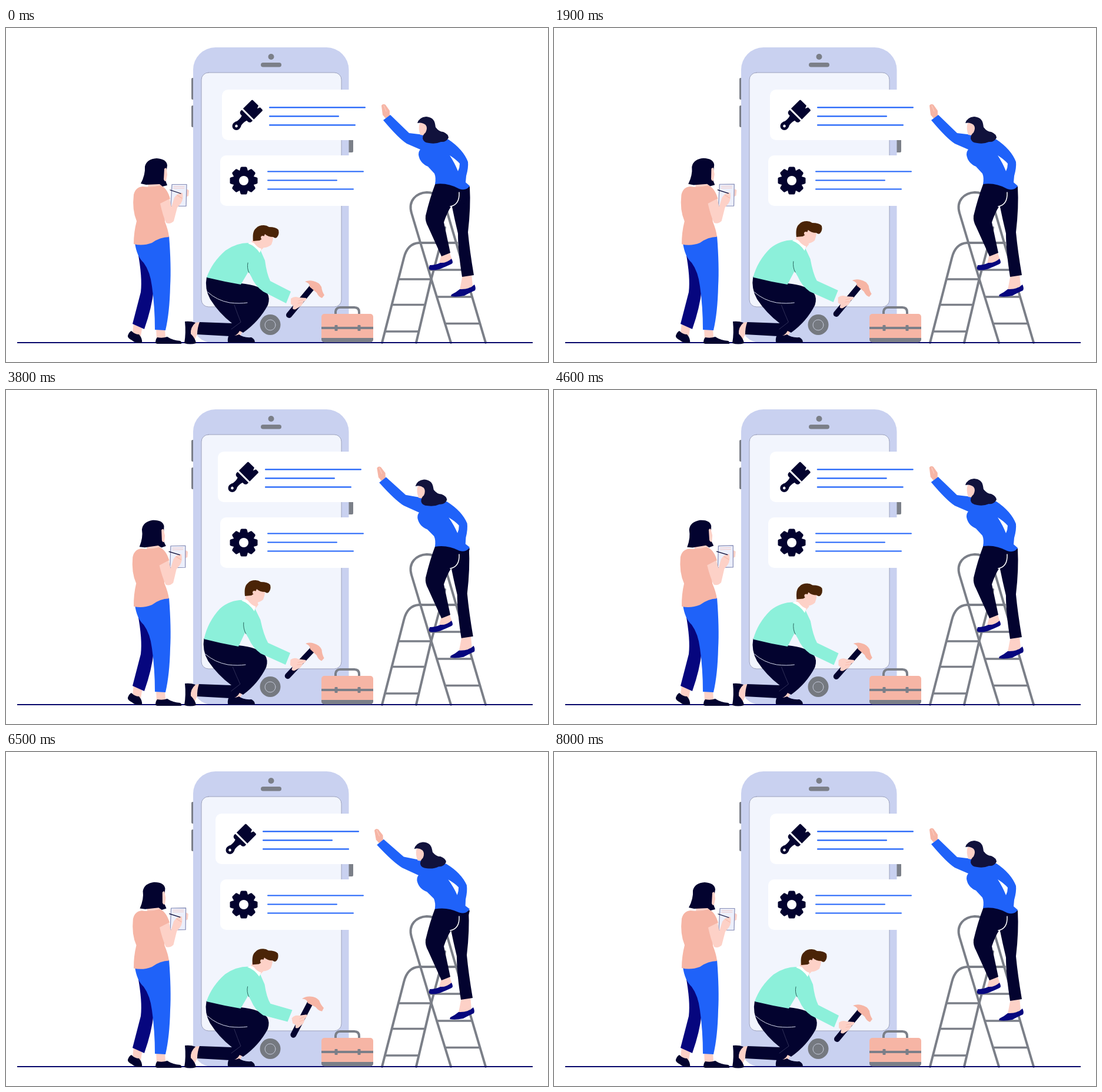
Animation, 921 px wide and 569 px high, one loop 8.1 s. Source, as an HTML page with a canvas:

```html
<!DOCTYPE html>
<html lang="en">
<head>
<meta charset="utf-8">
<title>Building an app</title>
<style>
html, body { margin: 0; width: 100%; height: 100%; overflow: hidden; background: #fff; }
canvas { display: block; width: 921px; height: 569px; }
</style>
</head>
<body>
<canvas id="stage" width="921" height="569"></canvas>
<script>
const ctx = document.getElementById('stage').getContext('2d');
const LOOP = 8100, STEP = 100;
const NAVY = '#03032f', HAIR = '#11123c', BLUE = '#1f62f9', INDIGO = '#06067e', PINK = '#f6b5a5',
  SKIN = '#fdd1c7', MINT = '#8cf0da', BROWN = '#4a2407', GRAY = '#7b7f88',
  BODY = '#c9d1f0', SCREEN = '#f2f5fd', WHITE = '#fff';

// Key poses as [time, value], eased between neighbours
const SLIDE = [[0, 0], [1900, 0], [2800, 1], [3100, 1], [3800, .64], [4700, 0], [5600, 0], [6500, 1], [6700, 1], [7800, 0]];
const SWAY = [[0, 0], [800, 0], [1900, .25], [3800, .75], [5000, 1], [5500, 1], [6500, .5], [8000, 0]];
const LEAN = [[0, 0], [800, -.06], [1900, .58], [3200, 1], [3800, 1], [5500, 0], [6500, .07], [8000, 0]];
const HAND_X = [[0, 0], [800, -1.5], [3800, -1], [5500, 0], [5900, 0], [6500, 2.5], [7100, 0]];
const HAND_Y = [[0, 0], [800, -2.5], [1900, -2], [3800, -1], [5500, 0], [5900, 0], [6500, -9.5], [7100, 0]];
const SWING = [[0, 0], [1900, 0], [3800, .06], [5500, 0], [5900, 0], [6500, -.21], [7100, 0]];

const clamp = v => Math.max(0, Math.min(1, v));

function pose(keys, t) {
  const i = keys.findIndex(k => k[0] > t);
  if (i < 0) return keys[keys.length - 1][1];
  const [t0, a] = keys[i - 1], [t1, b] = keys[i];
  const p = (t - t0) / (t1 - t0);
  return a + (b - a) * p * p * (3 - 2 * p);
}

function fill(d, color) {
  ctx.fillStyle = color;
  ctx.fill(new Path2D(d));
}

function stroke(d, color, width) {
  ctx.strokeStyle = color;
  ctx.lineWidth = width;
  ctx.stroke(new Path2D(d));
}

function disc(x, y, r, color) {
  ctx.fillStyle = color;
  ctx.beginPath();
  ctx.arc(x, y, r, 0, 7);
  ctx.fill();
}

function box(x, y, w, h, r, color) {
  ctx.fillStyle = color;
  ctx.beginPath();
  ctx.roundRect(x, y, w, h, r);
  ctx.fill();
}

function moved(x, y, draw) {
  ctx.save();
  ctx.translate(x, y);
  draw();
  ctx.restore();
}

function turned(x, y, angle, draw) {
  moved(x, y, () => {
    ctx.rotate(angle);
    ctx.translate(-x, -y);
    draw();
  });
}

function phone() {
  box(315, 85, 6, 37, 2, GRAY);
  box(315, 132, 6, 37, 2, GRAY);
  box(580, 186, 10, 26, 2, GRAY);
  box(318, 33, 264.5, 503, [38, 38, 32, 32], BODY);
  box(332, 76, 238, 399, 12, SCREEN);
  ctx.strokeStyle = '#9da2bd';
  ctx.lineWidth = 1;
  ctx.stroke();
  disc(450.5, 49, 5, GRAY);
  box(433, 59, 35, 7.5, 4, GRAY);
  disc(449, 505.5, 17.5, '#757980');
  stroke('M458 506A9 9 0 1 1 440 506A9 9 0 1 1 458 506', '#c3c8d8', 1);
}

function card(x, y, firstLine) {
  box(x, y, 268, 86, 10, WHITE);
  [163, 118, 146].forEach((w, i) => box(x + 80, firstLine + 15 * i, w + 1, 2.2, 1, BLUE));
}

function brush(x, y) {
  moved(x, y, () => {
    ctx.rotate(-Math.PI / 4);
    fill('M0 -13L20 -13Q22 -13 22 -11L22 2L17 4L22 6L22 11Q22 13 20 13L0 13Z', NAVY);
    fill('M-3 -13L-3 13L-6 13Q-10 12 -10 8L-10 6Q-15 4 -22 5Q-25 7 -29 7A7 7 0 0 1 -29 -7Q-25 -7 -22 -5Q-15 -4 -10 -6L-10 -8Q-10 -12 -6 -13Z', NAVY);
    disc(-29, 0, 2.3, WHITE);
  });
}

function gear(x, y) {
  disc(x, y, 18, NAVY);
  for (let i = 0; i < 8; i++) {
    turned(x, y, i * Math.PI / 4, () =>
      fill(`M${x - 7.5} ${y - 15}L${x - 5.5} ${y - 22}Q${x - 5} ${y - 23.5} ${x - 3.5} ${y - 23.5}L${x + 3.5} ${y - 23.5}Q${x + 5} ${y - 23.5} ${x + 5.5} ${y - 22}L${x + 7.5} ${y - 15}Z`, NAVY));
  }
  disc(x, y, 8, WHITE);
}

function toolbox() {
  stroke('M560 488L560 483Q561 476 568 476L592 476Q600 476 600 484L600 488', GRAY, 4);
  box(536, 487, 88, 48, 5, PINK);
  box(536, 509, 88, 4, 0, GRAY);
  box(536, 528, 88, 7.5, [0, 0, 5, 5], GRAY);
  box(558.5, 506, 5, 10, 1, GRAY);
  box(597.5, 506, 5, 10, 1, GRAY);
}

function ladder() {
  stroke('M639 536L676 392Q682 367 702 366L766 366', GRAY, 4);
  stroke('M697 536L722 430L746 340', GRAY, 4);
  stroke('M668 428L722 428M656 471.5L712 471.5M645 517L701 517', GRAY, 3.5);
  stroke('M756 536L724 432L689 315C683 294 697 281 715 280C733 280 744 293 748 308L765 366L815 536', GRAY, 4);
  stroke('M719 412L776 412M733 458L791 458M746 503.5L805 503.5', GRAY, 3.5);
}

function climber(k) {
  // Legs
  fill('M740 386L754 383L758 395L745 403L736 400Z', SKIN);
  fill('M720 404Q730 404 738 400Q748 401 757 393Q761 400 757 402Q744 408 736 411Q724 414 719 411Q718 408 720 404Z', INDIGO);
  moved(-2 * k, -2 * k, () => {
    fill('M776 420L791 418L793 440L776 447L771 446Z', SKIN);
    fill('M757 454Q764 451 771 445Q787 446 796 437Q799 443 797 447Q786 452 779 456Q765 459 756 457Z', INDIGO);
    fill('M752 266L788 271Q790 305 785 348Q788 380 795 421L775 424Q768 380 768 350Q762 325 757 300Z', NAVY);
  });
  fill('M730 264Q720 290 713 320Q712 329 717 338L740 389L755 383L744 331Q750 313 757 303L781 298L788 270Q760 258 730 264Z', NAVY);
  stroke('M770 280Q771 301 755 304', WHITE, 1.5);

  turned(760, 270, -.05 * k, () => {
    const at = (x, y, f = 1) => `${x - 5 * k * f} ${y - 5 * k * f}`;
    fill(`M${at(638, 132)}Q${at(641, 128)} ${at(645, 131)}L${at(652, 141)}L${at(652, 150)}L${at(645, 154)}L${at(640, 148)}Z`, PINK);
    stroke(`M${at(642, 132)}L${at(646, 142)}`, SKIN, 1);
    fill(`M${at(641, 157)}L${at(653, 148)}L${at(685, 179, .9)}L710 182L752 190Q777 207 785 228Q786 238 782 252L781 263L788 269Q782 278 770 274Q750 263 729 266Q731 255 728 248L717 236Q703 230 701 216Q701 210 704 207L${at(681, 197, .8)}Q${at(667, 188, .9)} ${at(641, 157)}Z`, BLUE);
    fill('M754 217Q765 224 771 231Q771 238 768 244Q763 231 754 217Z', WHITE);
    fill('M703 162L716 160L719 186L711 190L710 183L704 182Q700 171 703 162Z', SKIN);
    fill('M699 162Q702 152 714 151Q727 152 729 163L730 169Q736 177 743 177Q752 181 752 187Q748 195 739 194Q730 198 719 196Q709 195 708 188Q708 182 713 178Q717 170 713 165Q707 160 699 162Z', HAIR);
  });
}

function writer(sway) {
  fill('M217 502L232 507L229 525L215 520Z', SKIN);
  fill('M255 511L270 512L271 528L256 530Z', SKIN);
  fill('M207 524Q209 518 213 516Q219 522 226 522Q232 529 231 536Q221 538 214 532Q206 528 207 524Z', NAVY);
  fill('M254 537Q254 530 257 527Q266 529 274 526Q283 532 296 533Q299 535 298 538L257 538Z', NAVY);
  fill('M224 382Q232 425 229 450L215 504L235 513Q248 476 251 445L244 385Z', INDIGO);
  fill('M219 366L277 354Q281 405 279 440Q278 485 271 515L253 514Q253 475 248 440Q245 415 234 400Q222 389 219 366Z', BLUE);

  turned(247, 365, -.0286 * sway, () => {
    fill('M242 260L263 260L264 273L241 273Z', SKIN);
    fill('M232 270Q248 272 263 268Q274 273 279 291L268 300L270 330Q276 345 277 356Q262 356 248 366Q232 372 217 368Q217 348 222 329Q214 310 217 284Q220 271 232 270Z', PINK);
    turned(252, 268, -.1 * sway, () => {
      fill('M229 265Q237 250 236 236Q239 223 256 222Q273 223 274 234L271 255Q271 262 274 268L266 270L261 266L238 267Z', NAVY);
      fill('M269 240Q273 236 273 243L274 250L272 260Q270 263 268 258Z', SKIN);
    });
    fill('M303 276Q308 273 311 277L310 286L304 289Z', SKIN);
    fill('M282 266.5L307 266.5L306 303.5L280 303.5Z', '#eceffb');
    stroke('M282 266.5L307 266.5L306 303.5L280 303.5Z', '#858bb5', 1.2);
    stroke('M285 270L303 270M285 273L303 273', '#f3c9c6', 1);
    fill('M262 299L278 291L281 305L286 289Q292 280 300 281Q302 292 297 299L291 306L285 329Q279 335 272 332Q266 318 262 299Z', SKIN);
    stroke('M279 276L297 282', NAVY, 1.3);
    stroke('M291 285L299 290', PINK, 1);
  });
}

function builder(lean, hx, hy, swing) {
  // Bends the back away from the hips; the forearm follows the hand
  const warp = arm => (_, x, y) => {
    const up = clamp((430 - y) / 93);
    const base = clamp((470 - x) / 24) * clamp((520 - y) / 70);
    const reach = arm * clamp((x - 435) / 40) * clamp((y - 410) / 30);
    return `${+x - lean * (4 * base + 10 * up) + hx * reach} ${+y - lean * 12 * up + hy * reach}`;
  };
  const bend = (d, arm = 0) => d.replace(/([\d.]+) ([\d.]+)/g, warp(arm));

  // Feet and trousers
  fill('M312 503L329 501L325 521L319 535L312 525Z', SKIN);
  fill('M304 500Q314 499 322 502Q313 510 314 521Q322 529 323 537Q313 540 303 537Q306 520 304 500Z', NAVY);
  fill('M384 510L402 516L396 528L381 524Z', SKIN);
  fill('M377 535Q376 526 380 522Q387 526 396 522Q403 528 417 527Q423 530 423 536L378 536Z', NAVY);
  fill(bend('M341 424L399 435Q432 438 444 452Q449 460 445 472Q430 500 403 519L397 516Q392 526 380 525L325 522Q325 511 329 501L384 503Q362 486 347 462Q337 444 341 424Z'), NAVY);
  stroke(bend('M343 450Q358 464 380 468Q397 470 410 468'), '#d8dcec', 1);
  stroke(bend('M388 472Q394 489 399 501L383 513'), '#3b3c62', .8);

  // Neck and head
  fill(bend('M420 358L436 362L439 373L431 381L416 368Z'), SKIN);
  moved(-14 * lean, -12 * lean, () => {
    fill('M421 358L433 348L455 352L453 363L451 369Q444 375 437 374L433 378L422 372Z', SKIN);
    fill('M420 363Q418 346 425 341Q429 336 438 336Q443 336 447 339Q459 339 463 344Q465 352 460 357Q457 359 454 356Q445 356 440 351Q437 359 431 362Z', BROWN);
    disc(436, 357, 3, SKIN);
  });

  // Jumper
  fill(bend('M341 425Q350 399 373 379Q391 366 413 366Q425 368 433 380L440 396Q443 419 449 431L484 449L476 469L437 449Q423 439 417 424L412 415L399 437Q370 432 341 425Z', 1), MINT);
  fill(bend('M411 367Q418 363 422 367Q427 374 434 376L431 383Q423 371 411 367Z'), WHITE);
  stroke(bend('M411 400Q409 409 413 417'), '#29665e', 1);

  moved(hx, hy, () => turned(494, 467, swing, () => {
    stroke('M481 489L520 442', NAVY, 10);
    fill('M508 432Q515 429 522 431Q532 433 536 441Q537 449 541 455L537 460Q531 458 528 451L516 441Q517 435 508 432Z', PINK);
    fill('M484 461Q490 456 497 459L510 460Q512 463 506 466L502 473L494 478Q490 481 487 478L488 473L484 470Z', SKIN);
    stroke('M497 465L505 463M496 469L503 468', PINK, .8);
  }));
}

function draw(now) {
  const t = Math.floor(now % LOOP / STEP) * STEP;
  const slide = pose(SLIDE, t), shift = -11 * slide;
  ctx.fillStyle = WHITE;
  ctx.fillRect(0, 0, 921, 569);
  ctx.lineCap = 'round';
  ctx.lineJoin = 'round';
  phone();
  card(367 + shift, 105, 134.2);
  brush(412 + shift, 146.5);
  card(364, 217, 243.4);
  gear(404, 260);
  ladder();
  box(19, 535, 876, 2, 0, '#050569');
  toolbox();
  climber(slide);
  writer(pose(SWAY, t));
  builder(pose(LEAN, t), pose(HAND_X, t), pose(HAND_Y, t), pose(SWING, t));
}

const start = performance.now();
function tick() {
  draw(performance.now() - start);
  requestAnimationFrame(tick);
}
tick();
</script>
</body>
</html>
```
